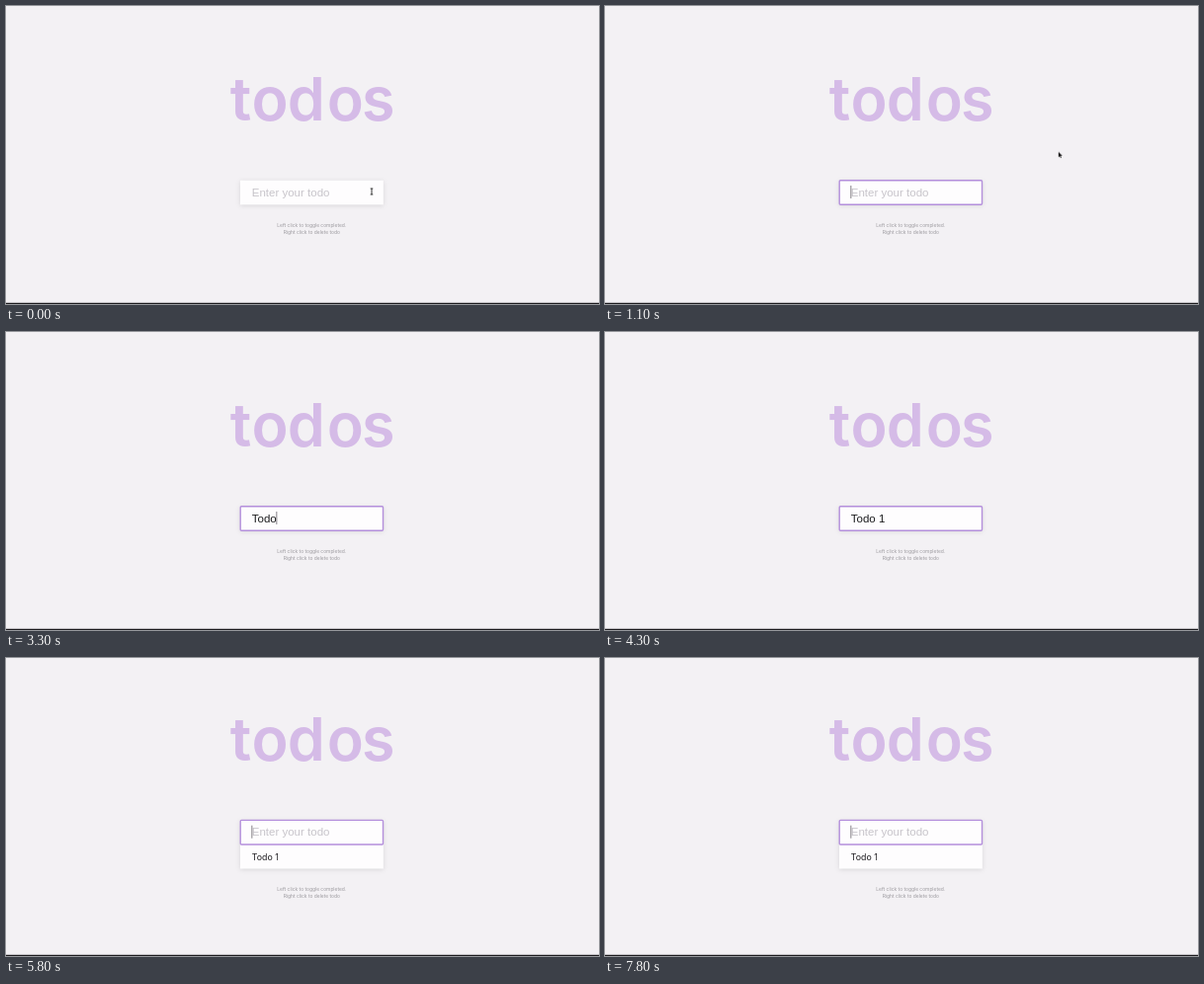
An HTML page for the animation above (8000 ms loop, 600 by 302 pixels).

```html
<!DOCTYPE html>
<html lang="en">
<head>
<meta charset="utf-8">
<title>todos</title>
<style>
  html, body { margin: 0; width: 100%; height: 100%; overflow: hidden; background: #f3f1f4; }
  svg { display: block; width: 100%; height: 100%; }

  .title { font: 600 61px Inter, sans-serif; fill: #d5bbe7; text-anchor: middle; }
  .field { font: 11.5px "Liberation Sans", Arial, sans-serif; white-space: pre; }
  .hint { fill: #c7c4ca; }
  .typed { fill: #1b1b1d; }
  .task { font: 400 8.8px Inter, sans-serif; fill: #1e1c20; }
  .help { font: 4.9px Inter, sans-serif; fill: #9b999e; text-anchor: middle; }
  .card { fill: #fefdfe; filter: drop-shadow(0 1.5px 2.5px rgba(0, 0, 0, .11)); }
  .ring { fill: none; stroke: #b48fdc; stroke-width: 1.4; }
  .caret { fill: #77747a; }

  /* One 8 s clock with hard changes: 1% = 80 ms */
  .a { animation: 8s step-end infinite; }
  .top { animation-name: rise; }
  .help { animation-name: sink; }
  .item { animation-name: added; }
  .ring { animation-name: focus; }
  .hint { animation-name: hint; }
  .k1 { animation-name: key1; }
  .k2 { animation-name: key2; }
  .k3 { animation-name: key3; }
  .k4 { animation-name: key4; }
  .caret { animation-name: caret; }
  .beam { animation-name: beam; }
  .arrow { animation-name: arrow; }

  @keyframes rise { 0% { transform: none; } 56.25%, 100% { transform: translateY(-12.3px); } }
  @keyframes sink { 0% { transform: none; } 56.25%, 100% { transform: translateY(12.3px); } }
  @keyframes added { 0% { visibility: hidden; } 56.25%, 100% { visibility: visible; } }
  @keyframes focus { 0% { visibility: hidden; } 1.25%, 100% { visibility: visible; } }
  @keyframes hint {
    0% { visibility: visible; }
    20% { visibility: hidden; }
    56.25%, 100% { visibility: visible; }
  }
  @keyframes key1 { 0%, 56.25%, 100% { visibility: hidden; } 20% { visibility: visible; } }
  @keyframes key2 { 0%, 56.25%, 100% { visibility: hidden; } 23.75% { visibility: visible; } }
  @keyframes key3 { 0%, 56.25%, 100% { visibility: hidden; } 27.5% { visibility: visible; } }
  @keyframes key4 { 0%, 56.25%, 100% { visibility: hidden; } 47.5% { visibility: visible; } }

  @keyframes caret {
    0%, 7.5% { opacity: 0; transform: none; }
    1.25%, 13.75% { opacity: 1; transform: none; }
    20% { opacity: 1; transform: translateX(7px); }
    23.75% { opacity: 1; transform: translateX(12.2px); }
    27.5%, 41.25% { opacity: 1; transform: translateX(25px); }
    35% { opacity: 0; transform: translateX(25px); }
    45% { opacity: 1; transform: translateX(28.2px); }
    47.5% { opacity: 1; transform: translateX(34.6px); }
    53.75% { opacity: 0; transform: translateX(34.6px); }
    56.25%, 66.25%, 78.75%, 91.25% { opacity: 0; transform: none; }
    60%, 72.5%, 85%, 97.5%, 100% { opacity: 1; transform: none; }
  }
  @keyframes beam {
    0% { visibility: visible; transform: translate(370px, 188px); }
    6.25% { visibility: visible; transform: translate(375px, 185.5px); }
    7.5%, 100% { visibility: hidden; transform: translate(375px, 185.5px); }
  }
  @keyframes arrow {
    0% { visibility: hidden; transform: translate(398px, 175px); }
    7.5% { visibility: visible; transform: translate(398px, 175px); }
    8.75% { visibility: visible; transform: translate(430px, 161px); }
    10% { visibility: visible; transform: translate(451px, 151.5px); }
    11.25% { visibility: visible; transform: translate(458.8px, 147.8px); }
    20%, 100% { visibility: hidden; transform: translate(458.8px, 147.8px); }
  }
</style>
</head>
<body>
<svg viewBox="0 0 600 302" preserveAspectRatio="none">
  <rect width="600" height="302" fill="#f3f1f4"/>

  <g class="a top">
    <text class="title" x="237.5 267 303.8 343.3 376.8" y="116">todos</text>

    <g class="card">
      <rect x="237" y="176.8" width="144.8" height="24.5"/>
      <rect class="a item" x="237" y="201" width="144.8" height="24.8"/>
    </g>
    <text class="a item task" x="248.8" y="217.1">Todo 1</text>

    <rect class="a ring" x="237.2" y="176.7" width="144.3" height="24.6" rx="1"/>
    <text class="a field hint" x="248.8" y="192.5">Enter your todo</text>
    <text class="field typed" x="248.8" y="192.5"><tspan class="a k1">T</tspan><tspan class="a k2">o</tspan><tspan class="a k3">do</tspan><tspan class="a k4"> 1</tspan></text>
    <rect class="a caret" x="248.4" y="182" width=".9" height="13"/>
  </g>

  <g class="a help">
    <text x="309.3" y="223.5">Left click to toggle completed.</text>
    <text x="309.3" y="230.6">Right click to delete todo</text>
  </g>

  <path class="a beam" d="M-1.3-3H1.3M0-3V3M-1.3 3H1.3" fill="none" stroke="#222" stroke-width=".9"/>
  <path class="a arrow" d="M0 0V5.4L1.3 4.3L2.1 6.2L3 5.8L2.2 3.9H3.9Z" fill="#111" stroke="#fff" stroke-width=".4" paint-order="stroke"/>

  <rect y="300.8" width="600" height="1.2" fill="#1d1c1f"/>
</svg>
</body>
</html>
```
